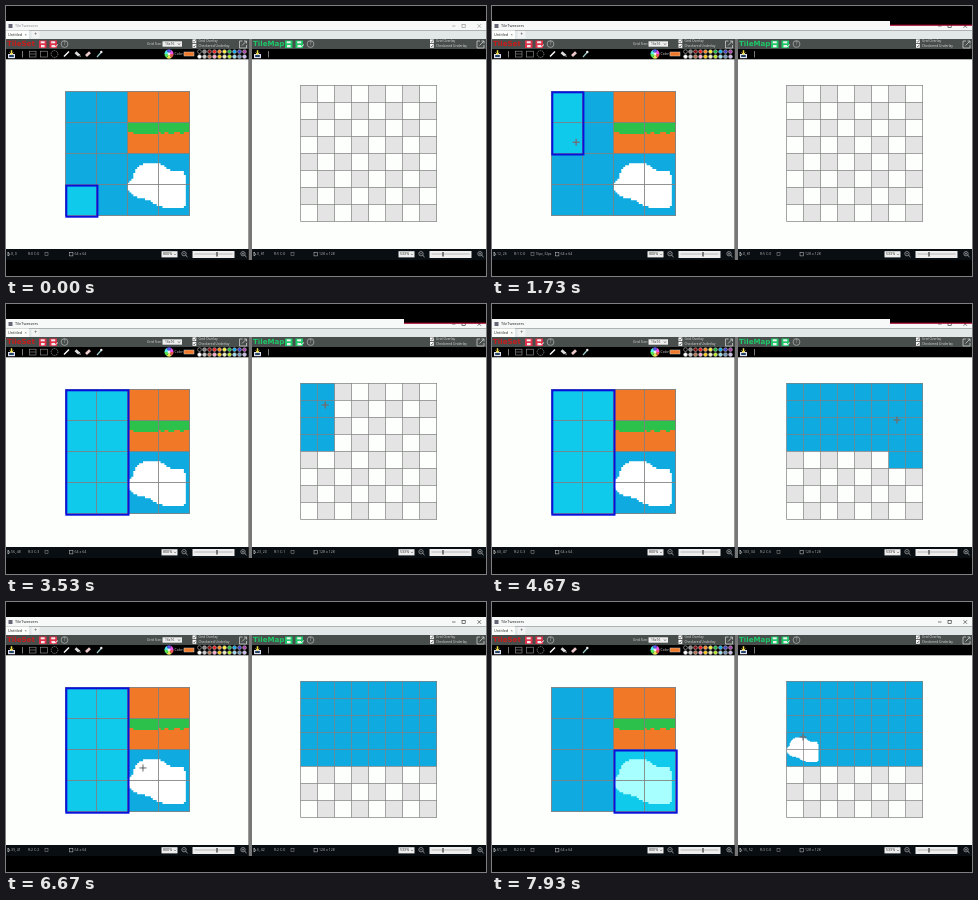
Animation, 480 px wide and 270 px high, one loop 8 s. Source, as an HTML page with a canvas:

```html
<!DOCTYPE html>
<html lang="en">
<head>
<meta charset="utf-8">
<title>Tile editor</title>
<style>
html, body { margin: 0; width: 100%; height: 100%; overflow: hidden; background: #000; }
canvas { display: block; width: 480px; height: 270px; }
</style>
</head>
<body>
<canvas id="stage"></canvas>
<script>
const LOOP = 8000;
const BLUE = '#0eaae0', ORANGE = '#f07826', GREEN = '#2cc14b', PAPER = '#fdfffc';
const SET = { x: 59.3, y: 85.3, cell: 31.1, n: 4, line: 'rgba(128,128,128,.85)' };
const MAP = { x: 294.5, y: 79, cell: 17.06, n: 8, line: 'rgba(128,128,128,.7)' };

const canvas = document.getElementById('stage');
const dpr = window.devicePixelRatio || 1;
canvas.width = 480 * dpr;
canvas.height = 270 * dpr;
const ctx = canvas.getContext('2d');
ctx.scale(dpr, dpr);

// Cursor path: time, x, y
const PATH = [
  [530, 244, 150], [1130, 72, 100], [1400, 72, 100], [1730, 84, 136],
  [2130, 112, 187], [2200, 112, 190], [2530, 244, 165], [2800, 245, 162],
  [3250, 308, 106], [3530, 319, 101], [4130, 421, 105], [4400, 421, 107],
  [4670, 405, 116], [5200, 392, 121], [5270, 390, 122], [5600, 336, 126],
  [6070, 303, 124], [6270, 303, 124], [6400, 262, 136], [6670, 137, 166],
  [7070, 128, 153], [7150, 128, 153], [7400, 172, 196], [7460, 172, 196],
  [7620, 187, 145], [7860, 311, 135], [8000, 311, 135]
];
// Cloud row spans in pixels, starting at row 5
const CLOUD = [[8, 16], [6, 18], [5, 19], [4, 21], [4, 28], [3, 28], [3, 29], [3, 29],
  [2, 29], [1, 29], [0, 29], [0, 29], [0, 29], [0, 29], [1, 29], [2, 29], [3, 29],
  [5, 29], [9, 29], [12, 29], [13, 29], [15, 29], [18, 28]];
const GRASS = '55566666666666665665566655566555';
const PALETTE = ['#000', '#888', '#811', '#e22', '#f82', '#fe3', '#2b4', '#1ae', '#44c', '#a4a',
  '#fff', '#ccc', '#b75', '#fac', '#fc1', '#eeb', '#be2', '#9de', '#79b', '#cbe'];

function rect(x, y, w, h, color) {
  ctx.fillStyle = color;
  ctx.fillRect(x, y, w, h);
}
function box(x, y, w, h, color, width = .6) {
  ctx.strokeStyle = color;
  ctx.lineWidth = width;
  ctx.strokeRect(x, y, w, h);
}
function line(color, width, ...points) {
  ctx.strokeStyle = color;
  ctx.lineWidth = width;
  ctx.beginPath();
  points.forEach(([x, y]) => ctx.lineTo(x, y));
  ctx.stroke();
}
function circle(x, y, r, fill, stroke) {
  ctx.beginPath();
  ctx.arc(x, y, r, 0, 7);
  if (fill) { ctx.fillStyle = fill; ctx.fill(); }
  if (stroke) { ctx.strokeStyle = stroke; ctx.lineWidth = .6; ctx.stroke(); }
}
function text(str, x, y, size, color, weight = '', family = '"Open Sans", sans-serif') {
  ctx.font = `${weight} ${size}px ${family}`;
  ctx.fillStyle = color;
  ctx.textBaseline = 'middle';
  ctx.fillText(str, x, y);
}
// Fills all rectangles as one shape, so no seams show between them
function fillRects(rects, color) {
  ctx.beginPath();
  rects.forEach(r => ctx.rect(...r));
  ctx.fillStyle = color;
  ctx.fill();
}

function cursorAt(t) {
  const i = PATH.findIndex(p => p[0] > t);
  if (i < 1) return PATH[0].slice(1);
  const [t0, x0, y0] = PATH[i - 1], [t1, x1, y1] = PATH[i];
  const k = (t - t0) / (t1 - t0);
  return [x0 + (x1 - x0) * k, y0 + (y1 - y0) * k];
}
function cellAt(grid, [x, y]) {
  return [Math.floor((x - grid.x) / grid.cell), Math.floor((y - grid.y) / grid.cell)];
}
const inside = (grid, p) => cellAt(grid, p).every(v => v >= 0 && v < grid.n);

// Last tile pixel the cursor touched in a grid
function lastPixel(grid, t, start) {
  for (let s = t; s > 530; s -= 66) {
    const p = cursorAt(s);
    if (inside(grid, p)) return cellAt({ ...grid, cell: grid.cell / 16 }, p);
  }
  return start;
}

// Selected cells: column, row, columns, rows
function selectionAt(t) {
  if (t < 1400) return [0, 3, 1, 1];
  const start = t < 7150 ? 1400 : 7150;
  const [c0, r0] = cellAt(SET, cursorAt(start));
  const [c1, r1] = cellAt(SET, cursorAt(Math.min(t, start === 1400 ? 2200 : 7460)));
  return [c0, r0, c1 - c0 + 1, r1 - r0 + 1];
}

function paintedCells(t) {
  const cells = new Set();
  for (let s = 3250; s <= Math.min(t, 6080); s += 15) {
    if (s > 3260 && s < 3560) continue;
    const [c, r] = cellAt(MAP, cursorAt(s));
    for (let i = 0; i < 8; i++) {
      const col = c + i % 2, row = r - 1 + (i >> 1);
      if (col < 8) cells.add(row * 8 + col);
    }
  }
  return cells;
}

function drawCloud(x, y, cell) {
  const px = cell / 16;
  rect(x, y, cell * 2, cell * 2, BLUE);
  fillRects(CLOUD.map(([a, b], i) =>
    [x + a * px, y + (i + 5) * px, (b - a + 1) * px, px]), '#fff');
}
function drawGrid({ x, y, cell, n, line: color }) {
  const snap = v => Math.floor(v) + .5;
  const right = x + n * cell, bottom = y + n * cell;
  for (let i = 0; i <= n; i++) {
    const lx = snap(x + i * cell), ly = snap(y + i * cell);
    line(color, 1, [lx, y], [lx, bottom]);
    line(color, 1, [x, ly], [right, ly]);
  }
}

function drawTileSet(t) {
  const { x, y, cell } = SET, px = cell / 16, mid = x + 2 * cell;
  rect(x, y, 4 * cell, 4 * cell, BLUE);
  rect(mid, y, 2 * cell, 2 * cell, ORANGE);
  fillRects([...GRASS].map((h, i) => [mid + i * px, y + cell, px, h * px]), GREEN);
  drawCloud(mid, y + 2 * cell, cell);
  const [c, r, w, h] = selectionAt(t);
  const area = [x + c * cell, y + r * cell, w * cell, h * cell];
  rect(...area, 'rgba(20,255,255,.37)');
  drawGrid(SET);
  box(area[0] + 1, area[1] + 1, area[2], area[3], '#0a10dc', 2);
}

function drawTileMap(t) {
  const { x, y, cell } = MAP, painted = paintedCells(t);
  const groups = { [PAPER]: [], '#e4e4e4': [], [BLUE]: [] };
  for (let i = 0; i < 64; i++) {
    const c = i % 8, r = i >> 3;
    const color = painted.has(i) ? BLUE : (c + r) % 2 ? PAPER : '#e4e4e4';
    groups[color].push([x + c * cell, y + r * cell, cell, cell]);
  }
  for (const color in groups) fillRects(groups[color], color);
  if (t >= 7860) drawCloud(x, y + 3 * cell, cell);
  drawGrid(MAP);
}

function saveIcon(x, color) {
  rect(x - 4, 34.5, 7.5, 7.5, color);
  rect(x - 2.3, 35.3, 4, 2, '#eee');
  rect(x - 2, 39, 3.6, 2.3, '#eee');
}
function checkbox(x, y, label) {
  rect(x - 2, y - 1.9, 3.8, 3.8, '#fff');
  line('#222', .6, [x - 1.2, y], [x - .3, y + 1], [x + 1.2, y - 1.1]);
  text(label, x + 4, y, 3.3, '#ddd');
}
function magnifier(x, plus) {
  circle(x - .5, 247.7, 2.2, null, '#ccc');
  line('#ccc', .8, [x + 1.2, 249.3], [x + 3, 251]);
  line('#ccc', .5, [x - 1.6, 247.7], [x + .6, 247.7]);
  if (plus) line('#ccc', .5, [x - .5, 246.6], [x - .5, 248.8]);
}
function expandIcon(x) {
  line('#ccc', .8, [x + 3, 35], [x, 35], [x, 42], [x + 7, 42], [x + 7, 39]);
  line('#ccc', .8, [x + 2.5, 39.5], [x + 7, 35]);
  line('#ccc', .8, [x + 4.5, 35], [x + 7, 35], [x + 7, 37.5]);
}

function drawPanel(x, right, name, color, iconColor, iconX, checkX) {
  rect(x, 33, right - x, 10, '#474e4b');
  rect(x, 43, right - x, 10.3, '#000');
  rect(x, 53.3, right - x, 189.7, PAPER);
  rect(x, 243, right - x, 11, '#080e12');
  text(name, x + 1, 38.4, 7.1, color, 'bold', '"DejaVu Sans", sans-serif');
  saveIcon(iconX, iconColor);
  saveIcon(iconX + 10.5, iconColor);
  line('#fff', .8, [iconX + 12, 41], [iconX + 15, 38.5]);
  circle(iconX + 21.5, 38, 3.4, null, '#ccc');
  text('?', iconX + 20.4, 38.2, 4.5, '#ddd');
  checkbox(checkX, 35.3, 'Grid Overlay');
  checkbox(checkX, 39.9, 'Checkered Underlay');
  expandIcon(right - 9);
  rect(x + 2, 48, 7, 4.2, '#dde');
  rect(x + 3.2, 49, 4.6, 2, '#246');
  line('#f0dc50', 1.5, [x + 5.5, 44.2], [x + 5.5, 48.5]);
  line('#f0dc50', 1, [x + 3.7, 46.6], [x + 5.5, 48.5], [x + 7.3, 46.6]);
  line('#999', .8, [x + 16.5, 45], [x + 16.5, 51.5]);
}

function drawTools() {
  text('Grid Size:', 141, 38.2, 3.4, '#ddd');
  rect(156.5, 35.3, 19.5, 5.4, '#eee');
  text('16x16', 159, 38.2, 3.3, '#222');
  line('#222', .6, [172, 37.5], [173, 38.6], [174, 37.5]);
  box(23.5, 45.2, 6.5, 5.8, '#999');
  line('#999', .6, [23.5, 48], [30, 48]);
  box(34.5, 45.2, 6.8, 5.8, '#999');
  ctx.setLineDash([1.4, .7]);
  circle(48.5, 48, 3.4, null, '#bbb');
  ctx.setLineDash([]);
  line('#fff', 1.4, [58, 50.5], [63, 45.5]);
  line('#ddd', 2.8, [69.5, 46.2], [73, 49.5]);
  line('#fff', .7, [73.5, 48], [74.2, 51]);
  line('#ecc', 2.8, [80, 50], [84, 46.3]);
  line('#9cc', 1.2, [91, 51], [95, 46.5]);
  circle(95.3, 46, 1.2, '#eee');
  for (let i = 0; i < 6; i++) {
    ctx.fillStyle = `hsl(${i * 60},75%,62%)`;
    ctx.beginPath();
    ctx.moveTo(163, 48);
    ctx.arc(163, 48, 4.6, i * Math.PI / 3, (i + 1) * Math.PI / 3);
    ctx.fill();
  }
  circle(163, 48, 1.4, '#eee');
  text('Color:', 168.5, 48, 3.4, '#ddd');
  rect(178, 46, 10, 4, ORANGE);
  box(178, 46, 10, 4, '#ccc', .5);
  PALETTE.forEach((color, i) =>
    circle(193.5 + i % 10 * 5, i < 10 ? 45.6 : 50.6, 1.9, color, '#bbb'));
}

function drawStatus(x, [px, py], selection, size, sizeX, zoomX, zoom, knob) {
  line('#ccc', .7, [x + 2, 246], [x + 2, 250], [x + 3.8, 248.5], [x + 2, 246]);
  text(`${px}, ${py}`, x + 5, 248.3, 3.5, '#bbb');
  text(`R:${py >> 4} C:${px >> 4}`, x + 22, 248.3, 3.5, '#bbb');
  box(x + 39, 246.7, 3, 3, '#999', .5);
  if (selection) text(selection, x + 43.5, 248.3, 3.2, '#bbb');
  box(sizeX, 246.5, 3.4, 3.4, '#ccc', .5);
  text(size, sizeX + 5, 248.3, 3.5, '#bbb');
  rect(zoomX, 245.2, 16, 6.2, '#eee');
  text(zoom, zoomX + 1.5, 248.4, 3.6, '#222');
  line('#222', .5, [zoomX + 12.5, 247.8], [zoomX + 13.5, 248.8], [zoomX + 14.5, 247.8]);
  magnifier(zoomX + 23);
  rect(zoomX + 31, 245, 42, 7, '#eee');
  line('#aaa', .8, [zoomX + 33, 248], [zoomX + 71, 248]);
  rect(knob - 1, 246, 2, 4.5, '#777');
  magnifier(zoomX + 82, true);
}

function drawWindow(t) {
  rect(0, 0, 480, 270, '#000');
  rect(0, 15, 480, 9.5, '#f7f9f8');
  rect(0, 24.5, 480, 8.5, '#e2e7e7');
  rect(0, 24.5, 23, 8.5, PAPER);
  rect(25.5, 25, 8, 7.5, '#f2f4f4');
  const ink = t < 1400 ? '#8a8a8a' : '#222';
  rect(2.5, 18, 4, 4, '#667');
  text('TileTweezers', 9, 20.3, 3.9, ink);
  text('Untitled', 2, 28.7, 3.8, '#222');
  text('×', 18.5, 28.6, 4, '#444');
  text('+', 28.2, 28.6, 5, '#333');
  line(ink, .6, [446, 20], [449.5, 20]);
  box(456, 18.3, 3.2, 3.2, ink);
  line(ink, .6, [471.5, 18.2], [475, 21.8]);
  line(ink, .6, [475, 18.2], [471.5, 21.8]);
  if (t >= 100 && t < 5000) {
    rect(398, 14, 82, 5, '#000');
    rect(398, 18.6, 82, 1.2, '#a00028');
  }
  rect(242.5, 33, 3.5, 221, '#777');
  drawPanel(0, 242.5, 'TileSet', '#c81c1c', '#e0304a', 37, 188.5);
  drawPanel(246, 480, 'TileMap', '#1ec868', '#1ec868', 283, 426);
  drawTools();
  const [, , w, h] = selectionAt(t);
  const dragging = t >= 1400 && t < 2200 || t >= 7150 && t < 7460;
  drawStatus(0, lastPixel(SET, t, [0, 0]), dragging && `${w * 16}px, ${h * 16}px`,
    '64 x 64', 63.5, 155.5, '800%', 211);
  drawStatus(246, lastPixel(MAP, t, [0, 81]), '', '128 x 128', 308, 392.5, '533%', 437);
}

function drawCursor(t) {
  const [x, y] = cursorAt(t);
  if (t < 530 || x > 240 && x < 248) return;
  ctx.globalCompositeOperation = 'difference';
  line('#ddd', .7, [x - 3.5, y], [x + 3.5, y]);
  line('#ddd', .7, [x, y - 3.5], [x, y + 3.5]);
  ctx.globalCompositeOperation = 'source-over';
}

function frame() {
  const t = performance.now() % LOOP;
  drawWindow(t);
  drawTileSet(t);
  drawTileMap(t);
  drawCursor(t);
  requestAnimationFrame(frame);
}
frame();
</script>
</body>
</html>
```
